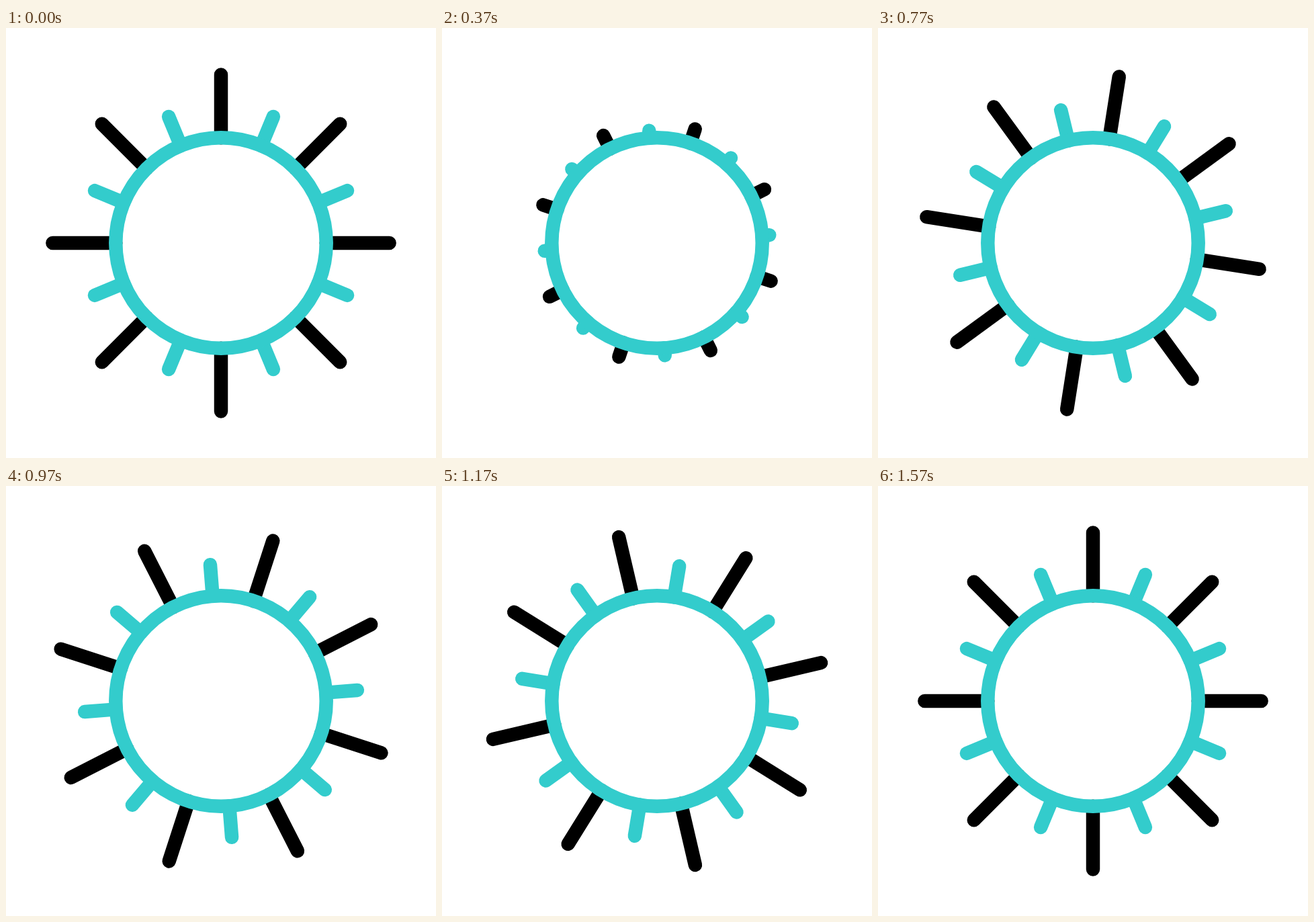
These frames come from a looping animation (640x640 px, 1670 ms). An HTML page with a canvas:

```html
<!DOCTYPE html>
<html lang="en">
<head>
<meta charset="utf-8">
<title>Sun</title>
<style>
  html, body { margin: 0; height: 100%; overflow: hidden; background: #fff; }
  canvas { display: block; }
</style>
</head>
<body>
<canvas id="stage" width="640" height="640"></canvas>
<script>
const ctx = document.getElementById('stage').getContext('2d');
const LOOP = 1670, STEP = 100 / 3, LAST = 47;
const RING = 156.7, SWING = 38.2, TEAL = '#33cccc';

// Symmetric ease-in-out: cubic-bezier(.45, 0, .55, 1), solved by bisection.
function ease(x) {
  x = Math.min(1, Math.max(0, x));
  let lo = 0, hi = 1, u = x;
  for (let i = 0; i < 24; i++) {
    u = (lo + hi) / 2;
    const v = 1 - u;
    if (1.35 * u * v * v + 1.65 * u * u * v + u * u * u < x) lo = u; else hi = u;
  }
  return u * u * (3 - 2 * u);
}

// Goes from 0 to 1 at the peak and back to 0 at the end.
const pulse = (step, peak, end) =>
  step < peak ? ease(step / peak) : 1 - ease((step - peak) / (end - peak));

function rays(color, tip, offset, turn, grow) {
  ctx.strokeStyle = color;
  ctx.beginPath();
  for (let i = 0; i < 8; i++) {
    const a = (turn + offset + i * 45) * Math.PI / 180;
    const r = RING + (tip - RING) * grow;
    ctx.moveTo(RING * Math.cos(a), RING * Math.sin(a));
    ctx.lineTo(r * Math.cos(a), r * Math.sin(a));
  }
  ctx.stroke();
}

function draw(now) {
  const step = Math.min(LAST, Math.floor((now % LOOP + 4) / STEP));
  const turn = -SWING * pulse(step, 18, 46.9);
  const grow = 1 - pulse(step, 8, 16.75);

  ctx.setTransform(1, 0, 0, 1, 0, 0);
  ctx.fillStyle = '#fff';
  ctx.fillRect(0, 0, 640, 640);
  ctx.translate(320, 320);
  ctx.lineCap = 'round';
  ctx.lineWidth = 20.5;

  rays('#000', 250.6, 0, turn, grow);
  rays(TEAL, 203.5, 22.5, turn, grow);
  ctx.beginPath();
  ctx.arc(0, 0, RING, 0, 2 * Math.PI);
  ctx.stroke();
}

function tick() {
  draw(performance.now());
  requestAnimationFrame(tick);
}
tick();
</script>
</body>
</html>
```
